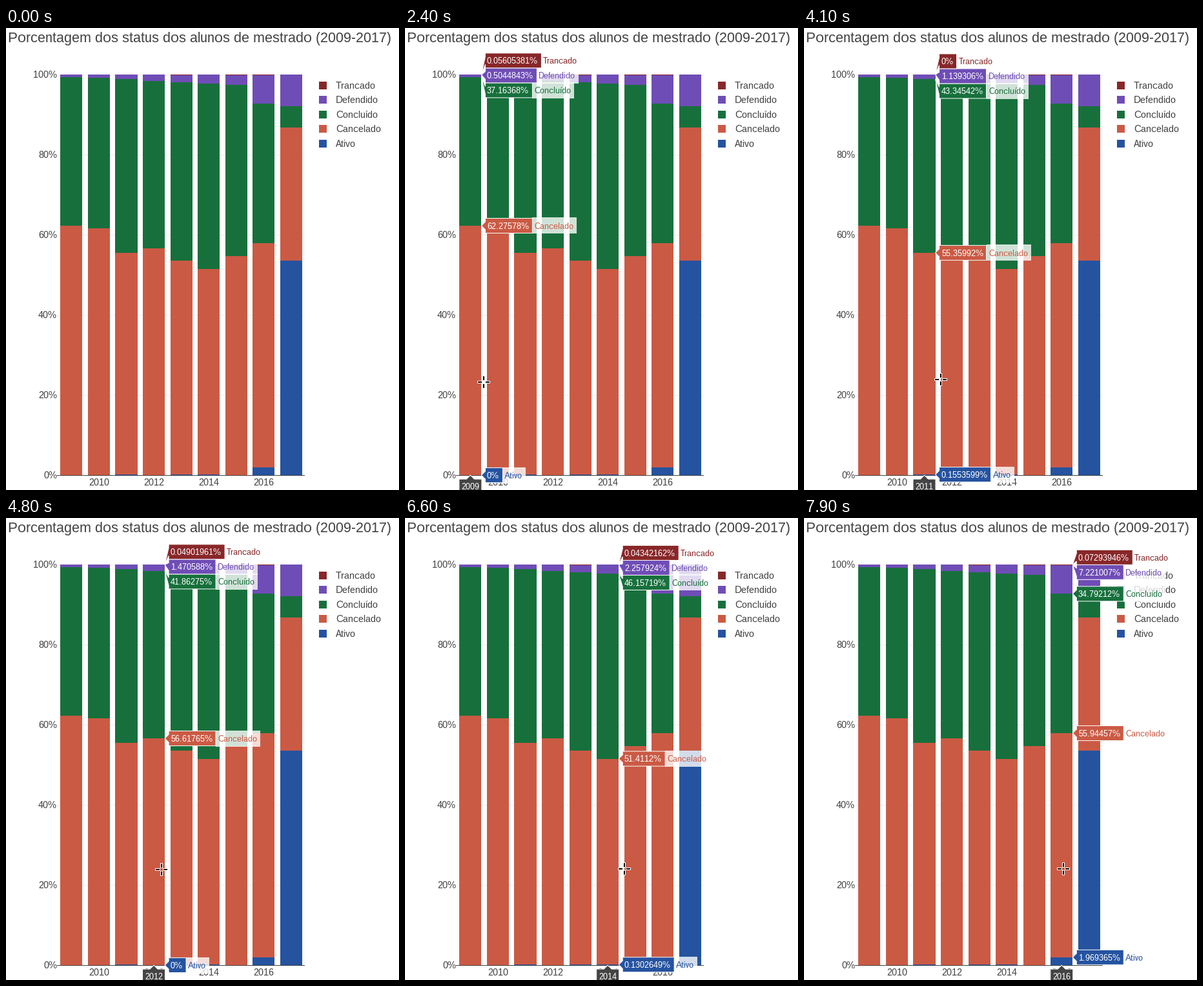
Recreate the animation shown at these times as a matplotlib script. Size 609 px wide and 715 px high, loop 8000 ms.

```python
import numpy as np
import matplotlib.pyplot as plt
from matplotlib.animation import FuncAnimation
from matplotlib.patches import Polygon, Rectangle

W, H, DPI = 609, 715, 64
STEP, LOOP, START = 100, 8000, 1000
PT = 72 / DPI
LEFT, TOP, SLOT, SPAN = 80.1, 72.1, 42.556, 620
RIGHT, BASE = LEFT + 9 * SLOT, TOP + SPAN
INK = "#444444"

# students per year, bottom of the stack first
STATUSES = {
    "Ativo": ("#2553a0", [0, 0, 3, 0, 5, 3, 0, 54, 1499]),
    "Cancelado": ("#cb5a44", [1111, 1168, 1069, 1155, 1122, 1184, 1290, 1534, 931]),
    "Concluído": ("#17703c", [663, 713, 837, 854, 935, 1063, 1009, 954, 149]),
    "Defendido": ("#6f4db6", [9, 14, 22, 30, 38, 52, 58, 198, 220]),
    "Trancado": ("#882729", [1, 0, 0, 1, 3, 1, 3, 2, 1]),
}
NAMES = list(STATUSES)
COLORS = [color for color, _ in STATUSES.values()]
COUNTS = np.array([counts for _, counts in STATUSES.values()])
SHARES = 100 * COUNTS / COUNTS.sum(axis=0)
TOPS = BASE - SHARES.cumsum(axis=0) * SPAN / 100

# pointer stops: time in ms, x
STOPS = [(START, 4), (1800, 99), (2400, 122), (2700, 122), (3300, 156),
         (4100, 212), (5400, 266), (6600, 340), (7900, 402)]

plt.rcParams.update({
    "font.family": "Liberation Sans",
    "text.hinting": "default",
    "text.hinting_factor": 1,
})
fig = plt.figure(figsize=(W / DPI, H / DPI), dpi=DPI, facecolor="white")
ax = fig.add_axes([0, 0, 1, 1])
ax.set(xlim=(0, W), ylim=(H, 0))
ax.axis("off")


def box(x0, y0, x1, y1, color, z=1, alpha=1, smooth=False):
    if not smooth:
        x0, y0, x1, y1 = (round(v) for v in (x0, y0, x1, y1))
    return ax.add_patch(Rectangle((x0, y0), x1 - x0, y1 - y0, fc=color, lw=0,
                                  alpha=alpha, zorder=z, antialiased=smooth))


def text(x, y, s, size, color=INK, ha="left", z=4):
    return ax.text(round(x), round(y), s, fontsize=size * PT, color=color,
                   ha=ha, va="baseline", zorder=z)


def width(label):
    return label.get_window_extent().width


def center(i):
    return LEFT + SLOT * (i + 0.5)


def draw_chart():
    text(3, 22, "Porcentagem dos status dos alunos de mestrado (2009-2017)", 21.6)
    for p in range(0, 101, 20):
        y = BASE - p * SPAN / 100
        box(LEFT, y, RIGHT, y + 1, "#eeeeee", 0)
        text(79, y + 5, f"{p}%", 15, ha="right")
    for i in range(COUNTS.shape[1]):
        # every bar reaches the axis; lower statuses cover the higher ones
        for k in reversed(range(len(NAMES))):
            box(center(i) - 0.4 * SLOT, TOPS[k, i],
                center(i) + 0.4 * SLOT, BASE, COLORS[k])
    box(LEFT - 1, BASE, RIGHT, BASE + 1, INK, 2)
    for i in range(1, 9, 2):
        text(center(i), 708, str(2009 + i), 15, ha="center")
    for k, (name, color) in enumerate(zip(NAMES[::-1], COLORS[::-1])):
        y = 88.7 + 22.5 * k
        box(484.7, y - 6, 496.7, y + 6, color, smooth=True)
        text(511, y + 5, name, 15)


def spread(anchors, gap=23):
    """Push crowded labels apart around their common mean, top to bottom."""
    groups = []
    for y in anchors:
        groups.append([y])
        while len(groups) > 1:
            a, b = groups[-2:]
            if np.mean(b) - np.mean(a) >= gap * (len(a) + len(b)) / 2:
                break
            groups[-2:] = [a + b]
    return [np.mean(g) + gap * (k - (len(g) - 1) / 2)
            for g in groups for k in range(len(g))]


def callout(points, color):
    return ax.add_patch(Polygon(points, closed=True, fc=color, ec="white",
                                lw=PT, joinstyle="miter", zorder=6))


def draw_hover(i):
    parts = []
    cx = center(i)
    tip = cx + 0.4 * SLOT
    x0 = tip + 6
    middles = spread(TOPS[::-1, i])[::-1]
    for name, color, share, top, cy in zip(NAMES, COLORS, SHARES[:, i],
                                           TOPS[:, i], middles):
        y0, y1 = cy - 11.5, cy + 11.5
        value = text(x0 + 3, cy + 4.7, f"{share:.7g}%", 13, "white", z=7)
        x1 = x0 + width(value) + 8
        label = text(x1 + 3, cy + 4.7, name, 13, color, z=7)
        parts += [
            value, label,
            box(x1, y0 - 1, x1 + width(label) + 8, y1 + 1, "white", 5, 0.8),
            callout([(tip, top), (x0, cy + 6), (x0, y1), (x1, y1),
                     (x1, y0), (x0, y0), (x0, cy - 6)], color),
        ]
    shoulder, half = BASE + 6, 17.5
    parts.append(callout([(cx, BASE), (cx + 6, shoulder), (cx + half, shoulder),
                          (cx + half, H + 6), (cx - half, H + 6),
                          (cx - half, shoulder), (cx - 6, shoulder)], INK))
    parts.append(text(cx, 714, str(2009 + i), 13, "white", "center", 7))
    return parts


def draw_pointer(x, y):
    parts = []
    for grow, color, z in ((1, "white", 8), (0, "black", 9)):
        half = 1 + grow
        for a, b in ((-9 - grow, -3 + grow), (3 - grow, 9 + grow)):
            parts += [box(x + a, y - half, x + b, y + half, color, z),
                      box(x - half, y + a, x + half, y + b, color, z)]
    return parts


def pointer(t):
    x = np.interp(t, *zip(*STOPS))
    y = 543 + 12 * np.exp(-(t - START) / 1450)
    return round(x), round(y)


overlay = []


def update(frame):
    while overlay:
        overlay.pop().remove()
    t = frame * STEP
    if t < START:
        return []
    # the hover box trails the pointer by one step
    seen = pointer(t - STEP)[0]
    if seen >= LEFT:
        overlay.extend(draw_hover(int((seen - LEFT) / SLOT)))
    overlay.extend(draw_pointer(*pointer(t)))
    return overlay


draw_chart()
anim = FuncAnimation(fig, update, frames=LOOP // STEP, interval=STEP,
                     init_func=lambda: [], repeat=True, repeat_delay=0,
                     blit=False)
plt.show()
```
